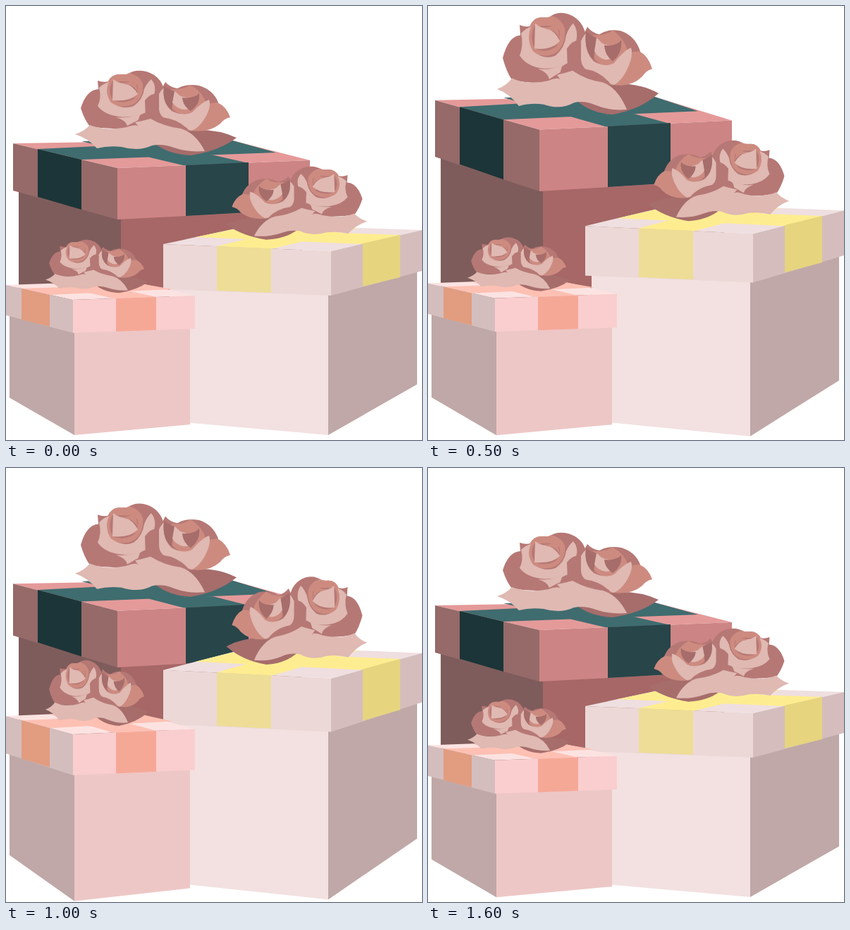
An HTML page for the animation above (1.7 s loop, 590 by 616 pixels).

```html
<!DOCTYPE html>
<html lang="en">
<head>
<meta charset="utf-8">
<title>Gift boxes</title>
<style>
  html, body { margin: 0; width: 100%; height: 100%; overflow: hidden; background: #fff; }
  svg { display: block; width: 590px; height: 616px; }
  .dark { fill: #a66d6b; }
  .rose { fill: #b67875; }
  .coral { fill: #cd8b80; }
  .light { fill: #dfb9b2; }
</style>
</head>
<body>
<svg viewBox="0 0 590 616">
  <defs>
    <g id="roses">
      <!-- leaf behind -->
      <path class="dark" d="M205 190Q225 210 262 212Q302 206 327 187Q300 174 262 176Z"/>
      <!-- left bloom -->
      <path class="rose" d="M106 145Q114 119 131 118L130 106Q138 109 146 107Q150 97 160 97L172 97Q183 89 199 93Q219 99 224 118L218 160L200 170Q160 178 119 171Q111 161 106 145Z"/>
      <path class="coral" d="M144 108Q149 97 161 97Q170 98 175 95Q190 99 194 110Q196 128 183 138Q168 147 148 138Q139 122 144 108Z"/>
      <path class="light" d="M132 116Q138 110 146 108Q139 123 149 137Q166 148 181 142Q194 133 196 118Q200 109 206 104Q214 113 210 126Q202 131 198 145Q188 160 160 157Q139 154 130 142Q136 130 132 116Z"/>
      <path class="rose" d="M151 107Q143 121 152 134Q166 140 181 132Q190 122 186 112L180 107Z"/>
      <path class="light" d="M152 104Q160 110 169 110Q180 113 187 125Q176 136 151 134Z"/>
      <path class="coral" d="M152 104Q168 114 183 103L187 122Q180 111 169 111Z"/>
      <path class="light" d="M156 158Q176 160 190 152Q196 140 200 136L198 158Q184 163 172 170Q170 162 156 158Z"/>
      <!-- right bloom -->
      <path class="rose" d="M197 134Q205 123 217 124L226 108Q232 115 243 117Q255 110 274 113Q294 119 301 137L296 160L262 178Q225 172 198 160Z"/>
      <path class="coral" d="M234 118Q252 119 262 112Q279 123 283 136Q276 150 258 156Q235 152 231 136Z"/>
      <path class="coral" d="M300 137Q313 143 318 158Q309 160 304 167Q288 180 264 177Q281 158 290 138Z"/>
      <path class="light" d="M217 125Q220 119 224 116Q221 137 235 149Q252 157 264 151Q278 136 288 133Q292 143 281 161Q274 172 264 177Q244 173 233 163Q216 158 217 143Z"/>
      <path class="dark" d="M224 114Q232 119 239 121L235 147Q221 138 224 114Z"/>
      <path class="light" d="M239 121Q253 132 272 133Q267 147 252 147Q241 145 236 137Z"/>
      <path class="dark" d="M250 130Q264 132 274 124Q276 139 262 149Q251 142 250 130Z"/>
      <path class="coral" d="M239 120Q254 124 264 118L272 126Q258 133 246 127Z"/>
      <!-- leaves in front -->
      <path class="rose" d="M190 155Q205 145 222 158Q246 161 260 177L240 182L185 169Z"/>
      <path class="light" d="M98 182Q111 178 119 169Q141 178 171 172Q185 167 188 171L183 165Q194 163 205 160Q224 171 248 174Q269 180 282 206Q258 208 238 201Q222 195 207 198Q188 207 164 200Q145 198 129 202Q115 187 98 182Z"/>
    </g>
  </defs>

  <g class="gift">
    <path fill="#7e5c5b" d="M18 260L163 300V440H18Z"/>
    <path fill="#a66766" d="M163 298L420 286V440H163Z"/>
    <path fill="#e49a99" d="M10 195L158 230L431 219L318 190Z"/>
    <path fill="#3f6c6f" d="M45 203L107 218L383 208L318 190ZM255 227L344 223L200 190L107 192Z"/>
    <path fill="#956a69" d="M10 195L158 230V303L10 262Z"/>
    <path fill="#1c3538" d="M45 203L107 218V289L45 271Z"/>
    <path fill="#cd8484" d="M158 230L431 219V289L158 303Z"/>
    <path fill="#284549" d="M255 226L344 222V293L255 298Z"/>
    <use href="#roses"/>
  </g>

  <g class="gift">
    <path fill="#f2e1e0" d="M232 400L457 408V609L232 589Z"/>
    <path fill="#bfa8a7" d="M457 408L583 374V537L457 609Z"/>
    <path fill="#efdfe0" d="M223 338L460 348L590 318L353 310Z"/>
    <path fill="#feed90" d="M269 328L506 338L559 325L322 317ZM299 341L376 345L500 315L420 312Z"/>
    <path fill="#ecd8d7" d="M223 338L461 348V411L223 402Z"/>
    <path fill="#eedd96" d="M299 341L376 344V407L299 404Z"/>
    <path fill="#d5bdbd" d="M461 348L590 318V376L461 411Z"/>
    <path fill="#e6d47f" d="M506 337L559 325V385L506 398Z"/>
    <use href="#roses" transform="matrix(-.873 0 0 .864 598 148.5)"/>
  </g>

  <g class="gift">
    <path fill="#bfa8a7" d="M5 436L97 460V609L5 556Z"/>
    <path fill="#edc7c6" d="M97 460L261 454V594L97 609Z"/>
    <path fill="#fce3e2" d="M0 396L94 417L268 411L174 390Z"/>
    <path fill="#fdc0b3" d="M22 401L62 410L236 402L196 395ZM156 416L213 413L119 392L62 394Z"/>
    <path fill="#d4bebd" d="M0 396L95 417V464L0 439Z"/>
    <path fill="#e29c80" d="M22 401L62 410V455L22 445Z"/>
    <path fill="#facece" d="M95 417L268 411V458L95 464Z"/>
    <path fill="#f6a897" d="M156 415L213 413V460L156 462Z"/>
    <use href="#roses" transform="matrix(.636 0 0 .627 -6.3 274.3)"/>
  </g>
</svg>
<script>
  const LOOP = 1700, STEP = 100, PULSE = 1300;
  const gifts = document.querySelectorAll('.gift');
  // Each box stretches vertically about its base, one after the other.
  const motion = [
    { delay: 0, base: 504, stretch: 0.227 },
    { delay: 200, base: 592, stretch: 0.231 },
    { delay: 400, base: 584, stretch: 0.237 }
  ];

  function draw(now) {
    const time = Math.floor(now % LOOP / STEP) * STEP;
    motion.forEach(({ delay, base, stretch }, i) => {
      const phase = Math.min(Math.max((time - delay) / PULSE, 0), 1);
      const scale = 1 + stretch * Math.sin(Math.PI * phase) ** 2;
      gifts[i].setAttribute('transform', `matrix(1 0 0 ${scale} 0 ${base * (1 - scale)})`);
    });
  }

  const start = performance.now();
  (function tick() {
    draw(performance.now() - start);
    requestAnimationFrame(tick);
  })();
</script>
</body>
</html>
```
